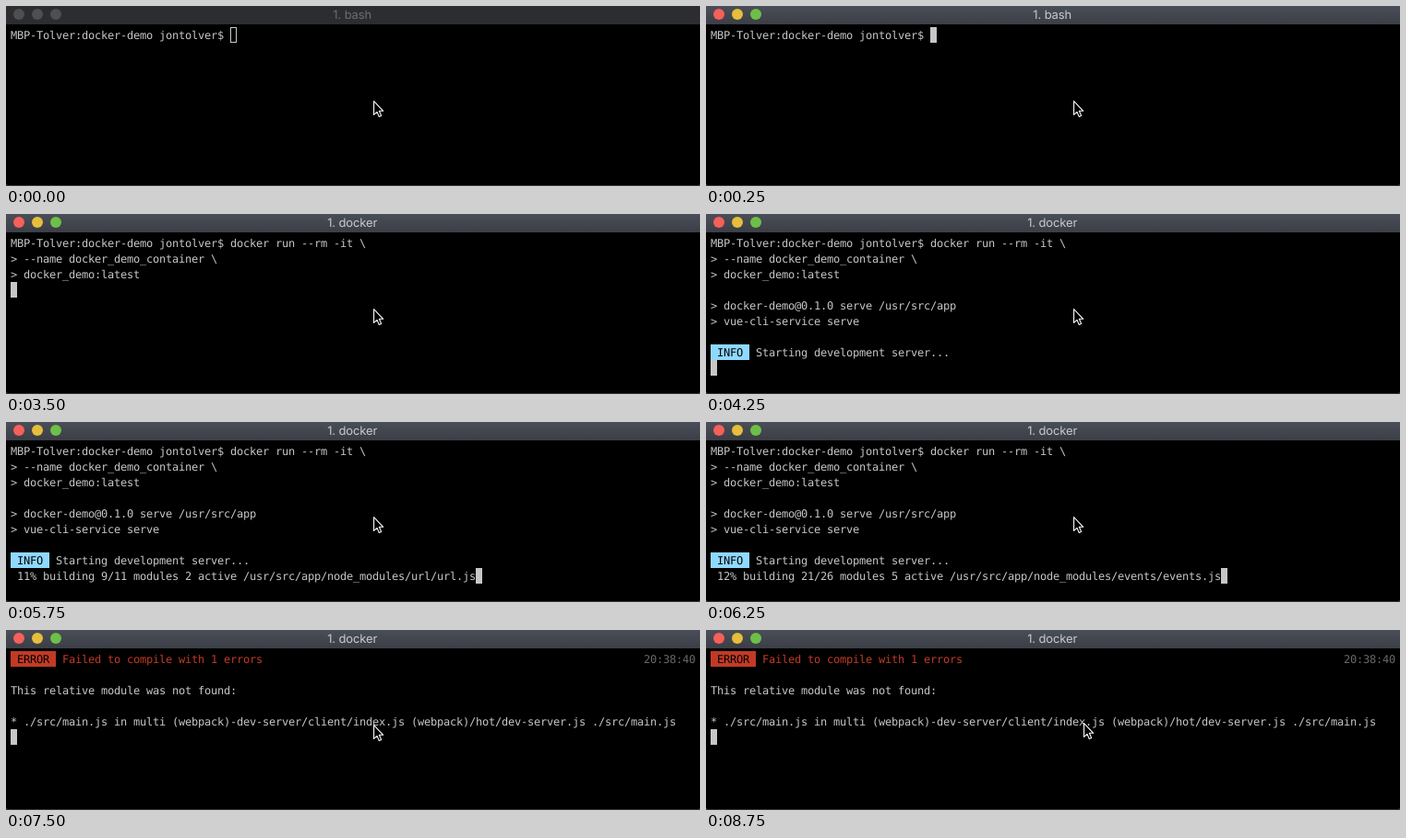
Recreate the animation shown at these times as an HTML page. Size 752 px wide and 196 px high, loop 9.75 s.

```html
<!DOCTYPE html>
<html lang="en">
<head>
<meta charset="utf-8">
<title>Terminal</title>
<style>
  html, body { margin: 0; width: 100%; height: 100%; overflow: hidden; background: #000; }
  svg { display: block; width: 752px; height: 196px; }
  text { white-space: pre; text-rendering: geometricPrecision; }
  .mono { font: 12px "DejaVu Sans Mono", monospace; letter-spacing: -.2245px; }
  .title { font: 13px Inter, sans-serif; letter-spacing: -.12px; text-anchor: middle; }
</style>
</head>
<body>
<svg id="stage" viewBox="0 0 752 196">
  <defs>
    <linearGradient id="bar" x2="0" y2="1">
      <stop offset="0" stop-color="#4a4e58"/>
      <stop offset="1" stop-color="#3b3e45"/>
    </linearGradient>
  </defs>
  <rect width="752" height="196" fill="#2b2f37"/>
  <path d="M0 20H752V192Q752 195 749 195H3Q0 195 0 192Z" fill="#000"/>
  <g data-from="0" data-to="250">
    <rect width="752" height="20" fill="#2c2d30"/>
    <g fill="#4e4f51">
      <circle cx="14" cy="9" r="6"/><circle cx="34" cy="9" r="6"/><circle cx="54" cy="9" r="6"/>
    </g>
    <text class="title" x="375.2" y="14" fill="#6c6d6f">1. bash</text>
  </g>
  <g data-from="250" data-to="9750">
    <rect width="752" height="20" fill="url(#bar)"/>
    <circle cx="14" cy="9" r="6" fill="#f6605a"/>
    <circle cx="34" cy="9" r="6" fill="#e5bf3c"/>
    <circle cx="54" cy="9" r="6" fill="#6cc048"/>
  </g>
  <text class="title" x="375.2" y="14" fill="#c9cacc" data-from="250" data-to="3500">1. bash</text>
  <text class="title" x="375.2" y="14" fill="#c9cacc" data-from="3500" data-to="9750">1. docker</text>
  <g id="screen"></g>
  <rect x="243.5" y="23.5" width="6" height="16" fill="none" stroke="#c7c7c7" data-from="0" data-to="250"/>
  <rect x="743" y="108" width="7" height="85" rx="3.5" fill="#868686" data-from="6750" data-to="7250"/>
  <path id="mouse" d="M.6 .7V15.4L4 12.3L6.3 17.6L8.7 16.6L6.4 11.3H10.8Z"
        fill="#000" stroke="#fff" stroke-width="1.1" stroke-linejoin="round"/>
</svg>
<script>
const LOOP = 9750, CELL = 7, LINE = 17, LEFT = 5, TOP = 23;
const GREY = '#c7c7c7', RED = '#c23a25';
const screen = document.getElementById('screen');
const mouse = document.getElementById('mouse');

function add(tag, attrs, from, to) {
  const el = document.createElementNS('http://www.w3.org/2000/svg', tag);
  for (const key in attrs) el.setAttribute(key, attrs[key]);
  el.dataset.from = from;
  el.dataset.to = to;
  return screen.appendChild(el);
}

function block(row, col, cells, from, to, fill = GREY) {
  add('rect', { x: LEFT + col * CELL, y: TOP + row * LINE, width: cells * CELL, height: LINE, fill }, from, to);
}

function write(row, col, str, from, to, fill = GREY) {
  add('text', { class: 'mono', x: LEFT + col * CELL, y: TOP + row * LINE + 13, fill }, from, to).textContent = str;
}

const caret = (row, col, from, to) => block(row, col, 1, from, to);

// Shell prompt and pasted command
const CLEAR = 6750;
write(0, 0, 'MBP-Tolver:docker-demo jontolver$ ', 0, CLEAR);
caret(0, 34, 250, 1500);
write(0, 34, 'docker run --rm -it \\', 1500, CLEAR);
write(1, 0, '> --name docker_demo_container \\', 1500, CLEAR);
write(2, 0, '> docker_demo:latest', 1500, CLEAR);
caret(2, 20, 1500, 2750);
caret(3, 0, 2750, 4000);

// Dev server start
write(4, 0, '> docker-demo@0.1.0 serve /usr/src/app', 4000, CLEAR);
write(5, 0, '> vue-cli-service serve', 4000, CLEAR);
caret(7, 0, 4000, 4250);
block(7, 0, 6, 4250, CLEAR, '#8fd8ff');
write(7, 1, 'INFO', 4250, CLEAR, '#000');
write(7, 7, 'Starting development server...', 4250, CLEAR);
caret(8, 0, 4250, 5500);

// Build progress, redrawn in place
const app = '/usr/src/app/', mods = app + 'node_modules/';
[
  ' 10% building 2/2 modules 0 active',
  ` 11% building 9/11 modules 2 active ${mods}url/url.js`,
  ` 11% building 13/15 modules 2 active ${mods}ip/ip.js`,
  ` 12% building 21/26 modules 5 active ${mods}events/events.js`,
  ' 98% after emitting'
].forEach((str, i) => {
  const from = 5500 + i * 250;
  write(8, 0, str, from, from + 250);
  caret(8, str.length, from, from + 250);
});

// Compile error
block(0, 0, 7, CLEAR, LOOP, RED);
write(0, 1, 'ERROR', CLEAR, LOOP, '#000');
write(0, 8, 'Failed to compile with 1 errors', CLEAR, LOOP, RED);
write(0, 98, '20:38:40', CLEAR, LOOP, '#686868');
write(2, 0, 'This relative module was not found:', CLEAR, LOOP);
write(4, 0, '* ./src/main.js in multi (webpack)-dev-server/client/index.js (webpack)/hot/dev-server.js ./src/main.js', CLEAR, LOOP);
caret(5, 0, CLEAR, LOOP);

const timed = [...document.querySelectorAll('[data-from]')].map(el => ({
  el, from: +el.dataset.from, to: +el.dataset.to
}));

function draw() {
  const t = performance.now() % LOOP;
  for (const { el, from, to } of timed) el.style.display = t >= from && t < to ? '' : 'none';
  const [x, y] = t < 8500 ? [398, 103] : t < 8750 ? [406, 102] : [409, 101];
  mouse.setAttribute('transform', `translate(${x} ${y})`);
  requestAnimationFrame(draw);
}
draw();
</script>
</body>
</html>
```
